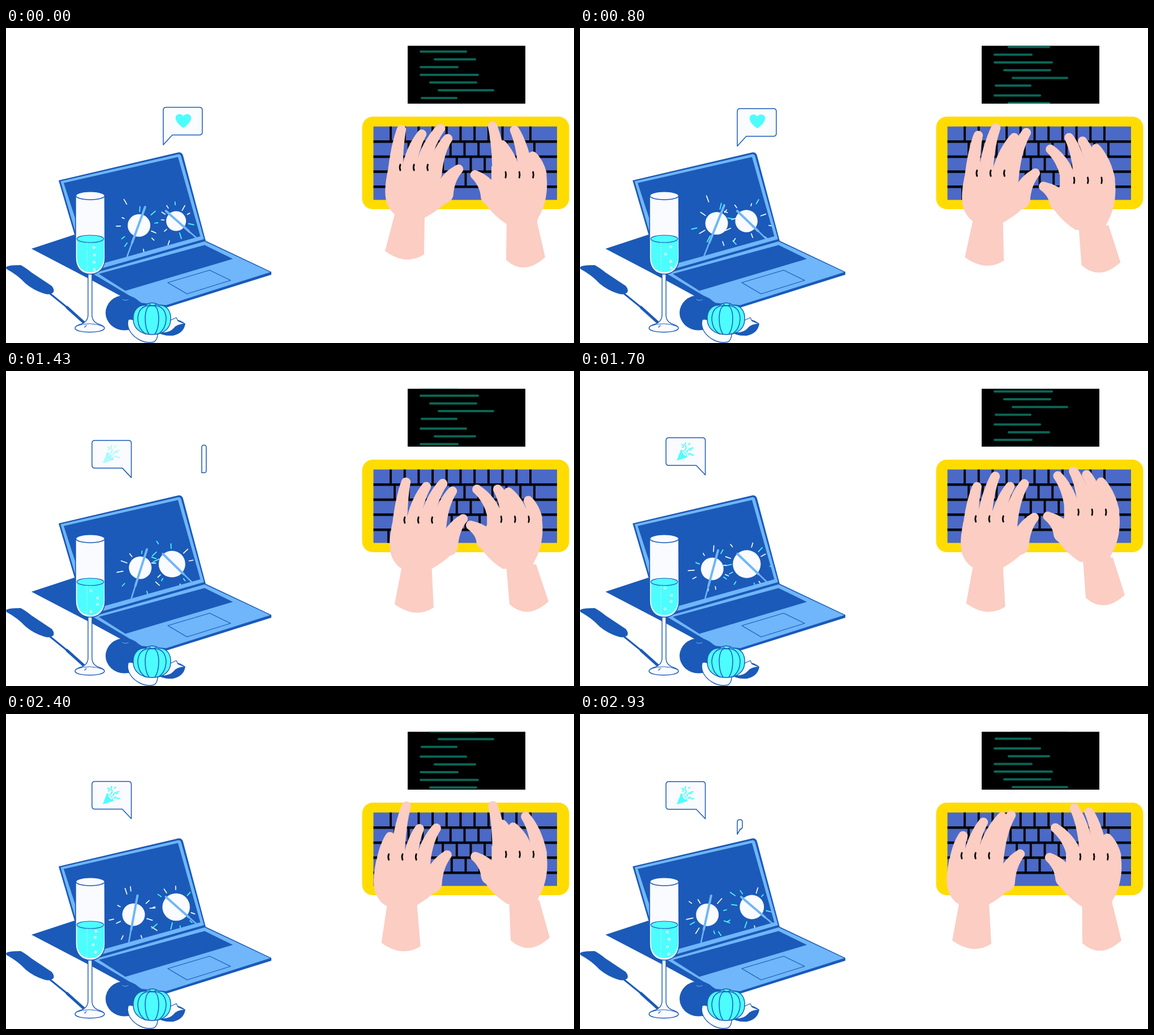
An HTML page with a canvas that plays this animation: 1004 by 558 pixels, repeating every 3010 ms.

```html
<!DOCTYPE html>
<html lang="en">
<head>
<meta charset="utf-8">
<title>Typing and celebrating</title>
<style>
html, body { margin: 0; width: 100%; height: 100%; overflow: hidden; background: #fff; }
canvas { display: block; width: 1004px; height: 558px; }
</style>
</head>
<body>
<canvas id="stage" width="1004" height="558"></canvas>
<script>
const ctx = document.getElementById('stage').getContext('2d');
const LOOP = 3010, TURN = Math.PI * 2;
const NAVY = '#1b5ab8', SKY = '#6fb6fa', CYAN = '#4dfdfe', PAPER = '#f9fbff';
const SKIN = '#fbcdc3', YELLOW = '#ffdc00', KEY = '#4b69c6', INK = '#050608', TEAL = '#0b6657';
ctx.lineJoin = 'round';

// ---- motion helpers ----
const clamp = k => Math.max(0, Math.min(1, k));
const smooth = k => k * k * (3 - 2 * k);
const mix = (a, b, k) => a + (b - a) * k;
const ramp = (t, from, to) => smooth(clamp((t - from) / (to - from)));
const wave = (t, peak, period = 3800) => Math.cos((t - peak) / period * TURN);

// Eases through a few key points, each [time, ...values].
function ease(keys, t) {
  const i = keys.findIndex(key => key[0] > t);
  if (i < 1) return keys.at(i).slice(1);
  const a = keys[i - 1], b = keys[i], k = ramp(t, a[0], b[0]);
  return a.slice(1).map((v, j) => mix(v, b[j + 1], k));
}

function randomizer(seed) {
  return () => {
    const v = Math.sin(++seed * 12.9898) * 43758.5453;
    return v - Math.floor(v);
  };
}

// ---- drawing helpers ----
function shape(d, fill, stroke, width = 1.5) {
  const path = new Path2D(d);
  if (fill) { ctx.fillStyle = fill; ctx.fill(path); }
  if (stroke) { ctx.strokeStyle = stroke; ctx.lineWidth = width; ctx.stroke(path); }
}

function line(x1, y1, x2, y2, color, width, cap = 'round') {
  ctx.lineCap = cap;
  shape(`M${x1} ${y1}L${x2} ${y2}`, null, color, width);
}

function oval(x, y, rx, ry, fill, stroke, width = 1.5) {
  ctx.beginPath();
  ctx.ellipse(x, y, rx, ry, 0, 0, TURN);
  if (fill) { ctx.fillStyle = fill; ctx.fill(); }
  if (stroke) { ctx.strokeStyle = stroke; ctx.lineWidth = width; ctx.stroke(); }
}

function scoped(draw, { clip, x = 0, y = 0, alpha = 1 }) {
  ctx.save();
  ctx.translate(x, y);
  ctx.globalAlpha = alpha;
  if (clip) ctx.clip(new Path2D(clip));
  draw();
  ctx.restore();
}

// ---- scrolling code ----
const codeLines = [[733, 80], [758, 71], [733, 65], [733, 101], [750, 81], [765, 96], [735, 61]];

function drawCode(t) {
  const box = 'M710 31.5H918V134H710Z';
  shape(box, '#000');
  scoped(() => codeLines.forEach(([x, length], i) => {
    const y = 41.8 + i * 13.7 - t * 0.0274;
    for (const copy of [y, y + 99.5]) line(x, copy, x + length, copy, TEAL, 4);
  }), { clip: box });
}

// ---- keyboard ----
function drawKeyboard() {
  ctx.fillStyle = YELLOW;
  ctx.beginPath();
  ctx.roundRect(629.5, 157, 366, 164, 19);
  ctx.fill();
  ctx.fillStyle = KEY;
  ctx.fillRect(649.5, 174.5, 324.5, 130);
  [680, 687, 698, 689, 676].forEach((first, row) => {
    const y = 174.5 + row * 26.7;
    const pitch = row < 4 ? 24.7 : 240;
    for (let x = first; x < 940; x += pitch) line(x, y, x, Math.min(y + 26, 304.5), INK, 4, 'butt');
    if (row) line(649.5, y, 974, y, INK, 4.5, 'butt');
  });
}

// ---- hands ----
// Drift keys: time, palm offset, wrist offset. Each finger rests between key
// presses at its raised tip and goes to its lowered tip at the press times.
const hands = [
  {
    drift: [[0, 0, 0, 0, 0], [1400, 8, 17, 17, 18], [2500, -21, 6, -7, 10], [2930, -22, 4, -12, 6]],
    palm: 'M675 252C669 280 668 303 677 318C683 328 689 333 699 336L740 336C757 327 775 314 786 300L768 272V250L690 244Z',
    wrist: [[687, 330], [740, 330], [739, 401], [707, 422], [670, 395]],
    thumb: { base: [773, 293], tip: [800, 250], tilt: 0.2 },
    knuckle: 688, marks: 697, markY: 247, curve: -2,
    fingers: [
      { up: [699, 180], down: [699, 212], presses: [2000, 2450, 2950] },
      { up: [728, 157], down: [735, 188], presses: [0, 500, 1100, 1450, 2950] },
      { up: [768, 178], down: [751, 197], presses: [1100, 1900, 2400] },
      { up: [784, 175], down: [781, 196], presses: [0, 1450, 2400] }
    ]
  },
  {
    drift: [[0, 0, 0, 0, 0], [1100, -12, 12, 3, 11], [1930, 0, -15, 11.5, -14], [2930, 1, -7, 4, -5]],
    palm: 'M954 252C960 285 954 315 940 338L938 348H886C868 337 850 319 841 300L858 270V245L946 240Z',
    wrist: [[885, 340], [938, 340], [953, 406], [916, 440], [884, 411]],
    thumb: { base: [857, 297], tip: [829, 260], tilt: -1.5 },
    knuckle: 873, marks: 883, markY: 260, curve: 1.5,
    fingers: [
      { up: [860, 174], down: [839, 209], presses: [700, 1100, 1500, 1900, 2950] },
      { up: [873, 174], down: [877, 207], presses: [0, 500, 1430, 2400] },
      { up: [899, 181], down: [896, 212], presses: [500, 1100, 1430, 2400] },
      { up: [918, 193], down: [931, 227], presses: [0, 1100, 1430, 2930] }
    ]
  }
];

function digit([bx, by], [tx, ty], baseR) {
  const cx = mix(bx, tx, 0.25), cy = mix(by, ty, 0.62), steps = 40;
  ctx.beginPath();
  for (let i = 0; i <= steps; i++) {
    const k = i / steps, r = mix(baseR, 8.3, k);
    const x = mix(mix(bx, cx, k), mix(cx, tx, k), k);
    const y = mix(mix(by, cy, k), mix(cy, ty, k), k);
    ctx.moveTo(x + r, y);
    ctx.arc(x, y, r, 0, TURN);
  }
  ctx.fillStyle = SKIN;
  ctx.fill();
}

function drawHand({ drift, palm, wrist, thumb, knuckle, marks, markY, curve, fingers }, t) {
  const [dx, dy, wx, wy] = ease(drift, t);
  const [a, b, c, bulge, d] = wrist.map(([x, y], i) =>
    i < 2 ? [x + (dx + wx) / 2, y + (dy + wy) / 2] : [x + wx, y + wy]);
  shape(`M${a}L${b}L${c}Q${bulge} ${d}Z`, SKIN);
  scoped(() => {
    const [x, y] = thumb.tip;
    digit(thumb.base, [x, y - dy * 0.4 + dx * thumb.tilt], 18);
    fingers.forEach(({ up, down, presses }, i) => {
      const gap = Math.min(...presses.map(p => Math.abs(t - p)));
      const lift = ramp(gap, 0, 480);
      digit([knuckle + i * 23, 258], [mix(down[0], up[0], lift), mix(down[1], up[1], lift)], 13.5);
    });
    shape(palm, SKIN);
    ctx.lineCap = 'round';
    for (let i = 0; i < 3; i++) {
      shape(`M${marks + i * 24.3} ${markY - 5}q${curve} 5 0 10`, null, INK, 2.8);
    }
  }, { x: dx, y: dy });
}

// ---- laptop and sparklers ----
const SCREEN = 'M102 274.5L304 228.5L343.5 369L150 423Z';

function drawSparkler(x, y, r, [x1, y1], [x2, y2], seed) {
  const rnd = randomizer(seed), rays = 11;
  for (let i = 0; i < rays; i++) {
    const angle = (i + rnd() * 0.8) * TURN / rays;
    const from = r + 4 + rnd() ** 2 * 20, to = from + 4 + rnd() * 8;
    const c = Math.cos(angle), s = Math.sin(angle);
    line(x + c * from, y + s * from, x + c * to, y + s * to, rnd() < 0.55 ? PAPER : CYAN, 1.7);
  }
  oval(x, y, r, r, PAPER);
  const mx = mix(x1, x2, 0.7), my = mix(y1, y2, 0.7);
  line(x1, y1, mx, my, SKY, 4);
  line(mx, my, x2, y2, SKY, 2.5);
}

function drawSparklers(t, step) {
  const left = wave(t, 800), right = wave(t, 1200);
  drawSparkler(233 + 8.5 * left, 351 - 5 * left, 20,
    [243 + 12 * left, 318 - 4 * left], [216 + 4 * wave(t, 1500), 408], step * 97);
  drawSparkler(298.5 - 5.5 * right, 342, 21.3 + 3.8 * wave(t, 2000),
    [281 - 4 * right, 324], [337 - 8 * right, 375], step * 97 + 41);
}

function drawLaptop(t, step) {
  shape('M45 391L121 366L160 434L232 472L240 492L205 476L150 446Z', NAVY);
  shape('M93 270L304 220.5Q311 219.5 313 226L353 377L156 437H142Z', NAVY);
  shape('M96.5 271.5L305 223.5Q308 223 309.5 227L350 374L158 429L142 428Z', SKY);
  shape(SCREEN, NAVY);
  scoped(() => drawSparklers(t, step), { clip: SCREEN });
  shape('M152 434L351 376L469 432V437L284 495L232 491Z', NAVY);
  shape('M153 435L351 378L467 432.5L283 491L240 487Z', SKY);
  shape('M164 435.5L351 384.5L401 409L211 465.5Z', NAVY);
  shape('M286 451L360 429L397 447L320 471Z', null, NAVY, 1.3);
}

// ---- table ----
function drawSpatula() {
  shape('M0 424Q2 420 26 420Q34 424 45 433L81 457Q87 465 83 469Q76 474 66 470Q48 464 35 453Q20 437 1 427Z', NAVY);
  line(76, 469, 108, 495, NAVY, 3);
  line(108, 495, 138, 522, NAVY, 5);
}

const WINE = 'M125.5 374H173L173 407C172 422 164 432 149 432.5C134 432 126 422 125.5 407Z';

function drawGlass(t) {
  shape('M145 434V508Q145 521 131 525Q122 528 122 532C124 541 172 541 174 532Q174 528 165 525Q152 521 152 508V434Z', PAPER, NAVY, 1.4);
  shape('M124 528Q148 519 173 529', null, NAVY, 1);
  line(139, 530, 142, 527, NAVY, 1.3);
  shape('M123 297V407C123 424 132 435.5 149 436C166 435.5 175 424 175 407L174.5 297Z', PAPER, NAVY, 1.6);
  shape(WINE, CYAN);
  oval(149, 373.5, 23.8, 6.5, CYAN, NAVY, 1.2);
  scoped(() => {
    ctx.setLineDash([2, 2]);
    line(143, 380, 143, 430, '#a7ffff', 1.2, 'butt');
    ctx.setLineDash([]);
    for (let i = 0; i < 4; i++) {
      const rise = (t * 0.018 + i * 13) % 50;
      oval(156 + 6 * Math.sin(i * 2.4 + rise * 0.06), 428 - rise, 1.8, 1.8, null, PAPER, 1.3);
    }
  }, { clip: WINE });
  oval(149, 297, 25.5, 7.2, PAPER, NAVY, 1.6);
}

function drawFruit() {
  oval(209.5, 504.5, 33.5, 31, NAVY);
  shape('M206 481Q211 484 216 481', null, SKY, 1);
  shape('M286 520Q301 511 317 524Q314 541 295 545Q276 546 267 538Z', NAVY);
  shape('M288 519L301 513L304 519L316 524Q302 525 297 532Q290 540 278 540L270 534Z', PAPER, NAVY, 1.2);
  shape('M216 517Q220 514 229 519L248 540L268 539Q269 550 262 556Q249 559 237 553Q216 542 215 523Z', PAPER, NAVY, 1.4);
  shape('M225 516C224 501 233 490 247 491Q258 483 270 491C284 490 292 502 291 516C291 532 279 543 258 543C238 543 225 532 225 516Z', CYAN, NAVY);
  for (const rib of [-25, -12, 12, 25]) {
    shape(`M258 492Q${258 + rib * 0.9} 490 ${258 + rib} 513Q${258 + rib} 533 ${258 + rib * 0.45} 542`, null, NAVY);
  }
  shape('M253 489Q259 495 266 489', null, NAVY);
}

// ---- speech bubbles ----
function bubble(x, y, w, h, tail, onLeft) {
  const r = Math.min(5, w / 2), right = x + w, low = y + h, run = Math.min(16, w * 0.6);
  const bottom = onLeft
    ? `V${low - r}Q${right} ${low} ${right - r} ${low}H${x + run}L${x} ${low + tail}`
    : `V${low + tail}L${right - run} ${low}H${x + r}Q${x} ${low} ${x} ${low - r}`;
  shape(`M${x} ${y + r}Q${x} ${y} ${x + r} ${y}H${right - r}Q${right} ${y} ${right} ${y + r}${bottom}Z`, PAPER, NAVY);
}

function drawHeart(t) {
  if (t >= 2900) return bubble(278, 187, 9, 17, 9, true);
  if (t >= 1500) return;
  const close = ramp(t, 1130, 1430);
  const y = 140.5 + t * 0.0027 - close * 13;
  bubble(278 + 68 * close, y, 69 - 61 * close, 49, 17.5 * (1 - close), true);
  if (close > 0.2) return;
  scoped(() => shape('M0 13C-18 1-16-11-7-11.5C-3-11.5 0-9 0-7C0-9 3-11.5 7-11.5C16-11 18 1 0 13Z', CYAN),
    { x: 313.5, y: 164 + t * 0.001 });
}

function drawParty(t) {
  const age = t - 1000;
  if (age < 30) return;
  const y = 119.5 - 8 * Math.exp(-age / 500) * wave(age, 50, 760);
  const w = Math.min(69.5, age * 0.45);
  bubble(221.5 - w, y, w, 49, 17, false);
  scoped(() => {
    shape('M171 158.5L178.5 139Q187 142 190 152.5Z', CYAN);
    shape('M179 140Q188 143 189 152Q181 149 179 140', PAPER, CYAN, 1.4);
    ctx.lineCap = 'round';
    shape('M185 140q4-3 2-7q-3-3 0-6M189 144q1-7 11-8M191 148q3-4 5-1q2 3 5 1M180 130l3 2M192 130l2-2M195 140l2-1M181 135l2-1', null, CYAN, 2);
  }, { y: y - 118, alpha: ramp(t, 1280, 1600) });
}

function draw(now) {
  const time = now % LOOP;
  // Two uneven steps per tenth of a second.
  const tenth = Math.min(29, Math.floor(time / 100)), late = time - tenth * 100 >= 30;
  const t = tenth * 100 + (late ? 30 : 0);
  ctx.clearRect(0, 0, 1004, 558);
  drawLaptop(t, tenth * 2 + late);
  drawSpatula();
  drawGlass(t);
  drawFruit();
  drawHeart(t);
  drawParty(t);
  drawCode(t);
  drawKeyboard();
  hands.forEach(hand => drawHand(hand, t));
}

const start = performance.now();
function tick() {
  draw(performance.now() - start);
  requestAnimationFrame(tick);
}
tick();
</script>
</body>
</html>
```
